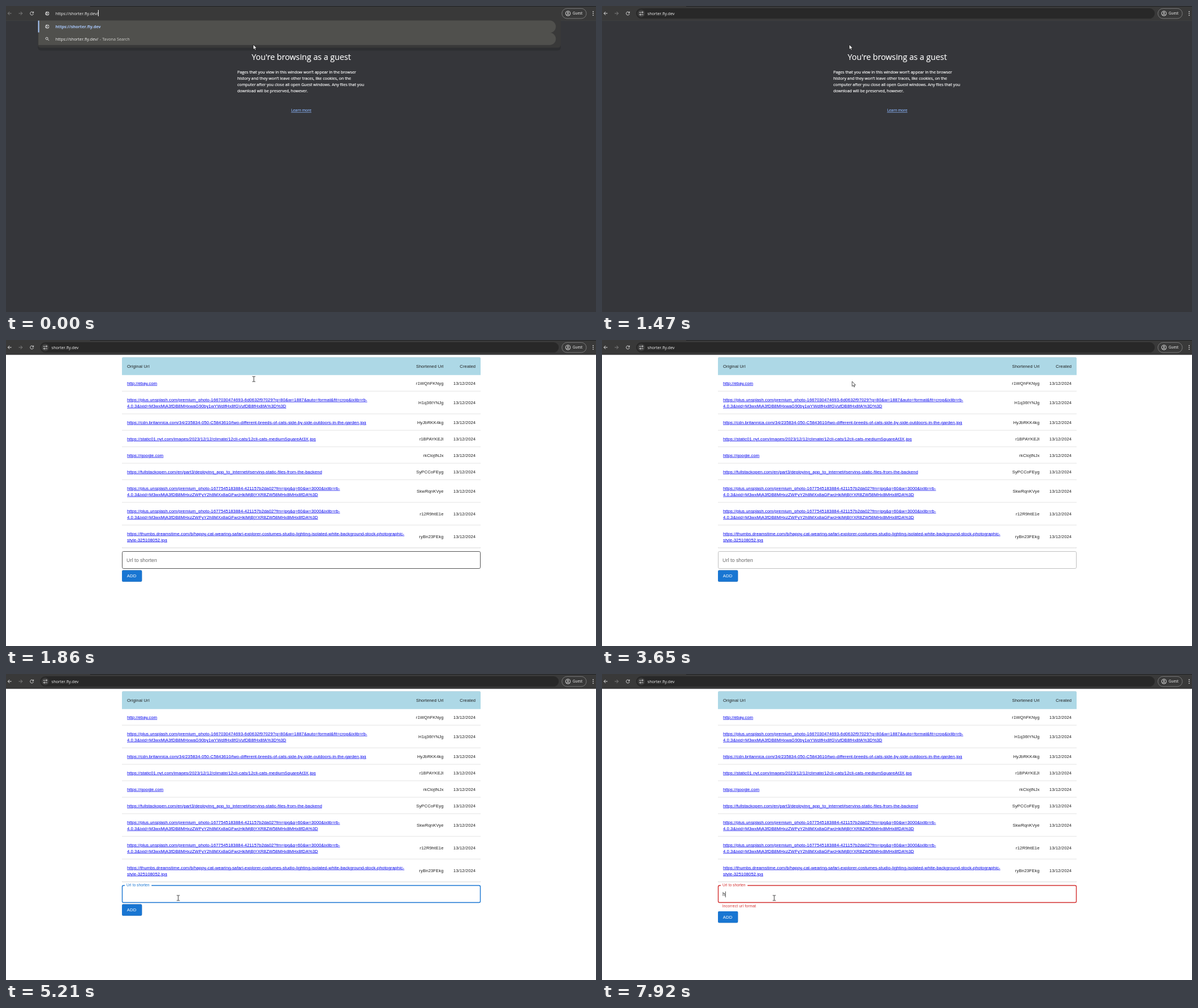
An HTML page for the animation above (8000 ms loop, 1038x539 px).

```html
<!DOCTYPE html>
<html lang="en">
<head>
<meta charset="utf-8">
<title>URL shortener</title>
<style>
  html, body { margin: 0; width: 100%; height: 100%; overflow: hidden; background: #35363a; }
  svg { display: block; width: 1038px; height: 539px; }
  .ui { font: 7.22px "Open Sans", "Noto Sans", sans-serif; fill: #f4f4f4; }
  .page { fill: #fff; stroke: #fff; stroke-width: .16; }
  .app { font: 7.665px "Liberation Sans", Arial, sans-serif; letter-spacing: .01071em; fill: #212121; }
  .icon { fill: none; stroke: #dcdcdc; stroke-width: 1; }
  .dim { stroke: #808080; }
  .link { fill: #0000ee; text-decoration: underline; }
  .end { text-anchor: end; }
  .raised { filter: drop-shadow(0 .6px .5px rgba(0, 0, 0, .4)); }
</style>
</head>
<body>
<svg viewBox="0 0 1038 539">
  <defs>
    <g id="globe">
      <circle r="3.4" fill="#dcdcdc"/>
      <path d="M-2.6-.8 0 .3-.5 2.6M.4-3 .2-1.4 2.4-.2 1.3 1.8" fill="none" stroke="#3c3c3c" stroke-width="1.1"/>
    </g>
  </defs>

  <rect width="1038" height="539" fill="#35363a"/>
  <g class="ui page" data-show="0 1600">
    <text x="519.5" y="94.8" font-size="14.2" text-anchor="middle">You're browsing as a guest</text>
    <g font-size="7.08">
      <text x="407" y="118.6">Pages that you view in this window won't appear in the browser</text>
      <text x="407" y="129.8">history and they won't leave other traces, like cookies, on the</text>
      <text x="407" y="141">computer after you close all open Guest windows. Any files that you</text>
      <text x="407" y="152.1">download will be preserved, however.</text>
    </g>
    <text x="519.5" y="186.2" font-size="6.6" text-anchor="middle" fill="#8ab4f8" stroke="#8ab4f8" text-decoration="underline">Learn more</text>
  </g>

  <!-- Browser toolbar -->
  <rect width="1038" height="26.2" fill="#393939"/>
  <rect x="148" width="890" height="1" fill="#202124"/>
  <rect y="25.6" width="1038" height=".6" fill="#444547"/>
  <g class="icon">
    <path id="back" d="M9.6 13H3.4M6.3 10 3.3 13l3 3"/>
    <path class="dim" d="M22.4 13h6.2M25.7 10l3 3-3 3"/>
    <path data-show="0 810 1470 8000" d="M47.7 11.2A2.9 2.9 0 1 0 48.3 13.8M48.4 9.8v2.3h-2.5"/>
    <path data-show="810 1470" d="M42.8 10.4l5.2 5.2m0-5.2-5.2 5.2"/>
    <rect x="978" y="4.4" width="43" height="17.6" rx="8.8" stroke="#8a8a8a" stroke-width=".8"/>
    <circle cx="988.7" cy="13.1" r="4.1"/>
    <circle cx="988.7" cy="12" r="1.3"/>
    <path d="M986 15.8q2.7-2.4 5.4 0"/>
  </g>
  <text class="ui" x="997" y="15.4" style="font-size:6.3px">Guest</text>
  <g fill="#dcdcdc">
    <circle cx="1033" cy="9.9" r=".9"/><circle cx="1033" cy="13.1" r=".9"/><circle cx="1033" cy="16.3" r=".9"/>
  </g>

  <!-- Suggestions -->
  <g class="ui" data-show="0 940">
    <path d="M56 25.5H976V72q0 6.5-6 6.5H62q-6 0-6-6.5z" fill="#2d2e31"/>
    <path d="M56 23H976V68q0 5.5-6 5.5H62q-6 0-6-5.5z" fill="#393939"/>
    <path d="M57 25.5H956.5a10.8 10.8 0 0 1 0 21.6 10.8 10.8 0 0 1 0 21.6H57z" fill="#50504d"/>
    <rect x="56.4" y="25.7" width="2" height="20.8" fill="#a8c7fa"/>
    <use href="#globe" x="72.6" y="36.2"/>
    <g class="icon"><circle cx="71.8" cy="57.2" r="2"/><path d="M73.3 58.7l2.3 2.3"/></g>
    <text x="87" y="38.8" font-weight="700" fill="#a8c7fa">https://shorter.fly.dev</text>
    <text x="87" y="60.6">https://shorter.fly.dev/</text>
    <text x="165" y="60.6" fill="#d0d0cc">- Tavona Search</text>
  </g>

  <!-- Address bar -->
  <g class="ui" data-show="0 810">
    <use href="#globe" x="72.6" y="13.2"/>
    <text x="87" y="15.7">https://shorter.fly.dev/</text>
    <rect data-show="0 380" x="162" y="7" width="1" height="11"/>
  </g>
  <g class="ui" data-show="810 8000">
    <rect x="60" y="4" width="912.5" height="18.2" rx="9.1" fill="#282828"/>
    <circle cx="69" cy="13.1" r="6.6" fill="#3c3c3c"/>
    <g class="icon">
      <path data-show="810 1190" d="M65.6 13.1a3.4 3.4 0 1 0 6.8 0a3.4 3.4 0 1 0-6.8 0M69 12.6v2.3M69 10.9v.9"/>
      <path data-show="1190 8000" d="M65.6 11.2h3M65.6 15.2h1.2M70 15.2h2.6M70 11.2a1.1 1.1 0 1 0 2.2 0a1.1 1.1 0 1 0-2.2 0M66.6 15.2a1.1 1.1 0 1 0 2.2 0a1.1 1.1 0 1 0-2.2 0"/>
    </g>
    <text x="80" y="15.7" font-size="7.15">shorter.fly.dev</text>
  </g>

  <!-- Shortener page -->
  <g class="app" data-show="1600 8000">
    <rect y="26.2" width="1038" height="513" fill="#fff"/>
    <rect id="paper" class="raised" x="204" y="30.6" width="631" rx="2.2" fill="#fff"/>
    <path d="M204 61.7V32.8q0-2.2 2.2-2.2H832.8q2.2 0 2.2 2.2V61.7z" fill="#add8e6"/>
    <text x="213" y="48.7">Original Url</text>
    <text id="shortHead" class="end" y="48.7">Shortened Url</text>
    <text class="end" x="826.2" y="48.7">Created</text>
    <g id="rows" data-show="1860 8000"></g>
    <g id="form">
      <rect id="box" x="204.5" y="67.5" width="630" height="30" rx="2.2" fill="none"/>
      <rect id="notch" x="209" y="66" width="47" height="3.4" fill="#fff"/>
      <text id="label" x="212">Url to shorten</text>
      <text data-show="7920 8000" x="212" y="85.6" font-size="8.76">h</text>
      <rect id="caret" y="78" width=".8" height="10.4"/>
      <text data-show="7920 8000" x="211.7" y="106.4" font-size="6.57" fill="#d32f2f" style="letter-spacing:.0333em">Incorrect url format</text>
      <g id="button">
        <rect class="raised" x="204" y="100.6" width="35.2" height="20.2" rx="2.2" fill="#1976d2"/>
        <text x="212.8" y="113.4" fill="#fff" style="letter-spacing:.02857em">ADD</text>
      </g>
    </g>
  </g>

  <g id="cursor">
    <path id="arrow" d="M0 0V8.6L2 6.8 3.4 9.8 4.8 9.2 3.5 6.3H6.1z" fill="#fff" stroke="#111" stroke-width=".7"/>
    <path id="beam" d="M-2.6-4.5H-.7L0-4 .7-4.5H2.6M0-4V4M-2.6 4.5H-.7L0 4 .7 4.5H2.6" fill="none" stroke="#222" stroke-width=".9"/>
  </g>
</svg>
<script>
const $ = id => document.getElementById(id);
const LOOP = 8000;

const catPhoto = [
  "https://plus.unsplash.com/premium_photo-1677545183884-421157b2da02?fm=jpg&q=60&w=3000&ixlib=rb-",
  "4.0.3&ixid=M3wxMjA3fDB8MHxzZWFyY2h8MXx8aGFwcHklMjBjYXR8ZW58MHx8MHx8fDA%3D"
];
const links = [
  ["r1WQhFKNyg", "http://ebay.com"],
  ["H1q36tYNJg",
    "https://plus.unsplash.com/premium_photo-1667030474693-6d0632f97029?q=80&w=1887&auto=format&fit=crop&ixlib=rb-",
    "4.0.3&ixid=M3wxMjA3fDB8MHxwaG90by1wYWdlfHx8fGVufDB8fHx8fA%3D%3D"],
  ["HyJbRKK4kg", "https://cdn.britannica.com/34/235834-050-C5843610/two-different-breeds-of-cats-side-by-side-outdoors-in-the-garden.jpg"],
  ["r1BPAYKEJl", "https://static01.nyt.com/images/2023/12/12/climate/12cli-cats/12cli-cats-mediumSquareAt3X.jpg"],
  ["rkClojtNJx", "https://google.com"],
  ["SyPCCoFEyg", "https://fullstackopen.com/en/part3/deploying_app_to_internet#serving-static-files-from-the-backend"],
  ["SkwRqnKVye", ...catPhoto],
  ["r12R9htE1e", ...catPhoto],
  ["ryBn23FEkg",
    "https://thumbs.dreamstime.com/b/happy-cat-wearing-safari-explorer-costumes-studio-lighting-isolated-white-background-stock-photographic-",
    "style-325108052.jpg"]
];

function buildRows() {
  const text = (x, y, cls, s) =>
    `<text x="${x}" y="${y}" class="${cls}">${s.replace(/&/g, "&amp;")}</text>`;
  let top = 61.7, html = "";
  for (const [code, ...lines] of links) {
    const height = 18.04 + 10.96 * lines.length, base = top + height / 2 + 2.5;
    lines.forEach((line, i) => {
      html += text(213, base + (i - (lines.length - 1) / 2) * 10.96, "link", line);
    });
    html += text(769.8, base, "end", code) + text(826.2, base, "end", "13/12/2024");
    top += height;
    html += `<rect x="204" y="${top - 1}" width="631" height=".8" fill="#dcdcdc"/>`;
  }
  $("rows").innerHTML = html;
}
buildRows();

// Pointer stops: time, x, y, shape
const pointer = [
  [0, 435, 68, "arrow"], [1600, 436, 68.8, "beam"], [3650, 440, 73, "arrow"],
  [3780, 425, 200, "arrow"], [3900, 400, 345, "arrow"], [4040, 345, 440, "arrow"],
  [4170, 318, 470, "arrow"], [4300, 305, 440, "arrow"], [4420, 298, 400, "beam"],
  [4560, 303, 394.5, "beam"]
];
// Label travel after the field is focused: time, progress
const labelSteps = [[0, 0], [4700, .5], [4820, .97], [4960, 1]];

const timed = [...document.querySelectorAll("[data-show]")].map(el =>
  [el, el.dataset.show.split(" ").map(Number)]);
const within = (t, ...spans) => spans.some((s, i) => i % 2 === 0 && t >= s && t < spans[i + 1]);
const latest = (steps, t) => steps.filter(s => s[0] <= t).pop();
const show = (el, on) => { el.style.display = on ? "" : "none"; };
const set = (id, attrs) => {
  for (const name in attrs) $(id).setAttribute(name, attrs[name]);
};

function draw(t) {
  for (const [el, spans] of timed) show(el, within(t, ...spans));
  const full = t >= 1860, focused = t >= 4700, error = t >= 7920;
  const hovered = within(t, 1600, 3650, 4420, 4700);
  const accent = error ? "#d32f2f" : "#1976d2";
  const p = latest(labelSteps, t)[1];

  set("back", { class: t < 1190 ? "dim" : "" });
  set("paper", { height: full ? 336.1 : 31.4 });
  set("shortHead", { x: full ? 769.8 : 656.3 });
  set("form", { transform: `translate(0 ${full ? 305 : 0})` });
  set("button", { transform: `translate(0 ${error ? 12.5 : 0})` });
  set("box", {
    stroke: focused ? accent : hovered ? "#555" : "#c0c0c0",
    "stroke-width": focused ? 1.4 : 1
  });
  show($("notch"), focused);
  set("label", {
    y: 85.6 - 16.2 * p,
    "font-size": 8.76 - 2.19 * p,
    fill: focused ? accent : "#666"
  });
  show($("caret"), within(t, 4700, 5210, 5840, 6360, 6870, 7380, 7920, LOOP));
  set("caret", { x: error ? 216.8 : 212.2 });

  const [, x, y, shape] = latest(pointer, t);
  set("cursor", { transform: `translate(${x} ${y})` });
  show($("arrow"), shape === "arrow");
  show($("beam"), shape === "beam");
}

function tick() {
  draw(performance.now() % LOOP);
  requestAnimationFrame(tick);
}
tick();
</script>
</body>
</html>
```
